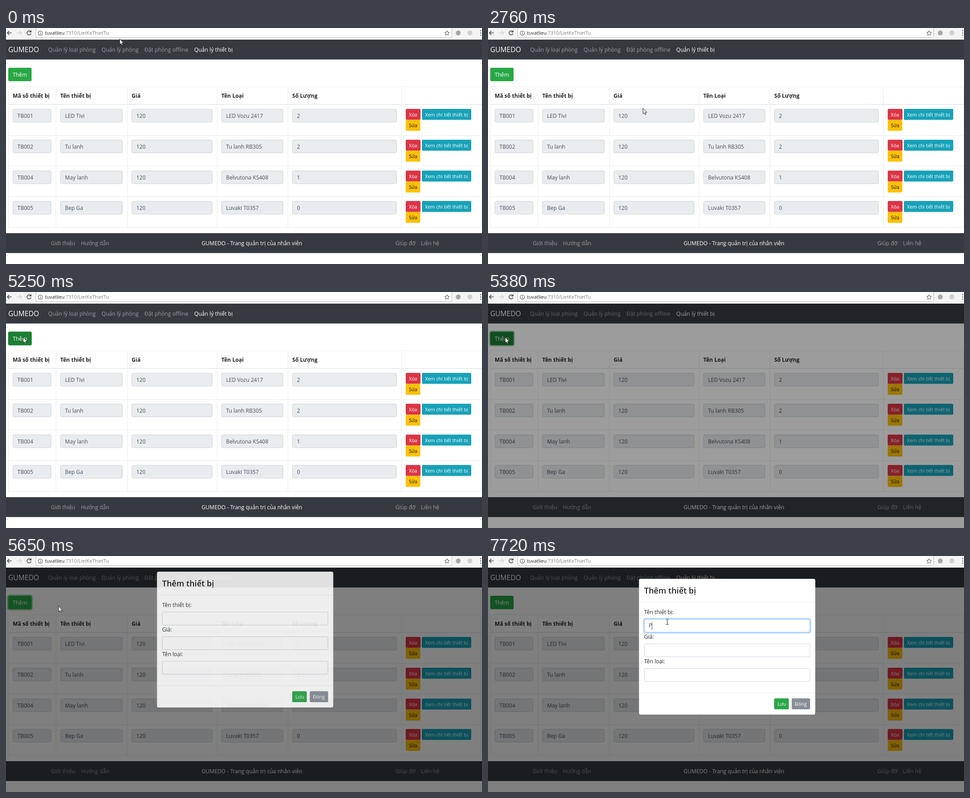
These frames come from a looping animation (1061 px wide and 528 px high, 8 s). An HTML page:

```html
<!DOCTYPE html>
<html lang="vi">
<head>
<meta charset="utf-8">
<title>Quản lý thiết bị</title>
<style>
html, body { margin: 0; width: 100%; height: 100%; overflow: hidden; background: #fff; }
svg { display: block; width: 1061px; height: 528px; }
text { font: 12.1px "Open Sans", "Noto Sans", sans-serif; white-space: pre; }
.brand { font-size: 15.5px; fill: #fff; }
.link { fill: #9a9da0; }
.on { fill: #fff; }
.head { font-weight: 700; fill: #212529; }
.val { font-size: 12px; fill: #495057; }
.small { font-size: 10.7px; }
.title { font-size: 18px; font-weight: 600; fill: #212529; }
.label { fill: #212529; }
.url { font-size: 10.7px; fill: #808080; }
.url tspan { fill: #222; }
.anim { animation: 8s step-end infinite; }
#shade { animation-name: shade; }
#add { animation-name: add; }
#ring { animation-name: ring; }
#modal { animation-name: modal; }
#focus { animation-name: focus; }
#caret { animation-name: caret; }
#typed { animation-name: typed; }
#pointer { animation-name: move; }
#arrow { animation-name: arrow; }
#beam { animation-name: beam; }

@keyframes shade {
  0% { opacity: 0; }
  67.15% { opacity: .39; }
  68.9%, 100% { opacity: .5; }
}
@keyframes add {
  0% { fill: #28a745; }
  62% { fill: #218838; }
  65.5% { fill: #1e7e34; }
  68.9%, 100% { fill: #28a745; }
}
@keyframes ring {
  0% { stroke-width: 0; }
  65.5% { stroke-width: 2px; }
  67.15% { stroke-width: 5px; }
  81.2% { stroke-width: 1px; }
  82.9%, 100% { stroke-width: 0; }
}
@keyframes modal {
  0% { opacity: 0; transform: translateY(-16px); }
  70.5% { opacity: .87; transform: translateY(-16px); }
  72.2% { opacity: 1; transform: translateY(-2px); }
  73.9%, 100% { opacity: 1; transform: none; }
}
@keyframes focus {
  0% { opacity: 0; }
  81.2% { opacity: .85; }
  82.9%, 100% { opacity: 1; }
}
@keyframes caret {
  0% { opacity: 0; transform: none; }
  81.2% { opacity: 1; transform: none; }
  86.4% { opacity: 0; transform: none; }
  93.05% { opacity: 1; transform: none; }
  96.4%, 100% { opacity: 1; transform: translateX(7px); }
}
@keyframes typed {
  0% { opacity: 0; }
  96.4%, 100% { opacity: 1; }
}
@keyframes move {
  0%, 2% { transform: translate(253px, 24px); animation-timing-function: steps(8, start); }
  15.6% { transform: translate(699px, 245px); animation-timing-function: steps(3, start); }
  20.7% { transform: translate(891px, 262px); animation-timing-function: steps(5, start); }
  29.5% { transform: translate(606px, 186px); animation-timing-function: steps(4, start); }
  36.1% { transform: translate(345px, 179px); animation-timing-function: steps(4, start); }
  43.3% { transform: translate(679px, 239px); animation-timing-function: steps(3, start); }
  48.4% { transform: translate(887px, 225px); animation-timing-function: steps(5, start); }
  57.2% { transform: translate(239px, 103px); animation-timing-function: steps(4, start); }
  63.9%, 68.9% { transform: translate(38px, 101px); animation-timing-function: steps(1, start); }
  70.5% { transform: translate(46px, 104px); animation-timing-function: steps(5, start); }
  78.8% { transform: translate(399px, 142px); animation-timing-function: steps(2, start); }
  82.2%, 100% { transform: translate(399px, 147px); }
}
@keyframes arrow {
  0% { opacity: 1; }
  77.1%, 100% { opacity: 0; }
}
@keyframes beam {
  0% { opacity: 0; }
  77.1%, 100% { opacity: 1; }
}
</style>
</head>
<body>
<svg viewBox="0 0 1061 528">
  <rect width="1061" height="528" fill="#fff"/>
  <rect y="26" width="1061" height="44.5" fill="#343a40"/>
  <rect y="459" width="1061" height="44.5" fill="#343a40"/>
  <g id="table"></g>
  <text class="brand" x="5" y="54">GUMEDO</text>
  <g id="links"></g>
  <rect id="ring" class="anim" x="5" y="89" width="52" height="30" rx="3" fill="none" stroke="#28a745" stroke-opacity=".5"/>
  <rect id="add" class="anim" x="5" y="89" width="52" height="30" rx="3"/>
  <text class="on" x="15" y="109">Thêm</text>
  <g id="actions"></g>
  <rect id="shade" class="anim" y="26" width="1061" height="502"/>

  <g id="toolbar">
    <rect width="1061" height="26" fill="#f4f4f4"/>
    <rect x="66.5" y="-3.5" width="927" height="25" rx="2" fill="#fff" stroke="#bdbdbd"/>
    <g fill="none" stroke="#4a4a4a" stroke-width="1.6">
      <path d="M12.5 11H3M7.5 6.5L3 11l4.5 4.5"/>
      <path d="M24 11h10M30 6.5l4.5 4.5-4.5 4.5" stroke="#cfcfcf"/>
      <path d="M55 8.2A4.5 4.5 0 1 0 55.7 12.2M56 5.5V9H52.3"/>
      <circle cx="76.5" cy="11.5" r="4.7" stroke-width="1.1"/>
      <path d="M76.5 10.8V14M76.5 8.6V9.8" stroke-width="1.2"/>
      <path d="M983 6l1.5 3.600 3.8.3-2.9 2.5.9 3.8-3.3-2-3.3 2 .9-3.8-2.9-2.5 3.8-.3z" stroke-width="1"/>
    </g>
    <text class="url" x="87" y="15"><tspan>tuvatlieu</tspan>:7310/LietKeThietTu</text>
    <circle cx="1008" cy="11" r="5.5" fill="#a8a8a8"/>
    <circle cx="1034" cy="11" r="5.5" fill="#d0d0d0"/>
    <path d="M1057 6h2M1057 11h2M1057 16h2" stroke="#555" stroke-width="2"/>
  </g>

  <g id="modal" class="anim">
    <rect x="336" y="50" width="394" height="306" rx="4.5" fill-opacity=".2"/>
    <rect x="336.5" y="51" width="393" height="304" rx="4" fill="#fff"/>
    <path d="M337 103.5H729M337 306.5H729" stroke="#e9ecef"/>
    <text class="title" x="348" y="84">Thêm thiết bị</text>
    <g id="form"></g>
    <g id="focus" class="anim" fill="none">
      <rect x="347" y="140" width="372" height="32" rx="4" stroke="#007bff" stroke-opacity=".25" stroke-width="3"/>
      <rect x="348.5" y="141.5" width="369" height="29" rx="3" stroke="#80bdff"/>
    </g>
    <text id="typed" class="val anim" x="358" y="160">P</text>
    <rect id="caret" class="anim" x="358" y="148" width="1" height="17" fill="#495057"/>
  </g>

  <g id="pointer" class="anim">
    <path id="arrow" class="anim" d="M.5 .5V13L3.3 10.4 5.2 14.8 7.2 14 5.4 9.7H9.3Z" fill="#fff" stroke="#111" stroke-width=".9"/>
    <path id="beam" class="anim" d="M-2.5 -5.5H-.5L.5 -5 1.5 -5.5H3.5M.5 -5V6M-2.5 6.5H-.5L.5 6 1.5 6.5H3.5" fill="none" stroke="#222"/>
  </g>
</svg>
<script>
const put = (id, parts) => { document.getElementById(id).innerHTML = parts.join(''); };
const text = (cls, x, y, s) => `<text class="${cls}" x="${x}" y="${y}">${s}</text>`;
const field = (x, y, w, fill) =>
  `<rect x="${x + .5}" y="${y + .5}" width="${w - 1}" height="29" rx="3" fill="${fill}" stroke="#ced4da"/>`;
const button = (x, y, w, color, s, ink = '#fff') =>
  `<rect x="${x}" y="${y}" width="${w}" height="24.5" rx="2.5" fill="${color}"/>` +
  `<text class="small" x="${x + 7}" y="${y + 16.5}" fill="${ink}">${s}</text>`;

const cols = [
  [5, 86, 'Mã số thiết bị'], [111, 139, 'Tên thiết bị'], [270, 180, 'Giá'],
  [470, 138, 'Tên Loại'], [628, 233, 'Số Lượng']
];
const rows = [
  ['TB001', 'LED Tivi', 120, 'LED Vozu 2417', 2],
  ['TB002', 'Tu lanh', 120, 'Tu lanh RB305', 2],
  ['TB004', 'May lanh', 120, 'Belvutona KS408', 1],
  ['TB005', 'Bep Ga', 120, 'Luvaki T0357', 0]
];
const rowY = i => Math.round(171 + i * 68.8);

const lines = [...cols.map(c => c[0]), 881, 1060].map(x => `M${x + .5} 131V447`).join('') +
  [131, 170, 171, 240, 308, 377, 446].map(y => `M5 ${y + .5}H1061`).join('');

put('table', [
  `<path d="${lines}" stroke="#e9ecef"/>`,
  ...cols.map(([x, , name]) => text('head', x + 10, 156, name)),
  ...rows.flatMap((row, i) => cols.map(([x, w], c) =>
    field(x + 10, rowY(i) + 10, w, '#e9ecef') + text('val', x + 20.5, rowY(i) + 30, row[c])))
]);

put('actions', rows.map((_, i) => {
  const y = rowY(i) + 10;
  return button(891, y, 33, '#dc3545', 'Xóa') +
    button(927, y, 110, '#17a2b8', 'Xem chi tiết thiết bị') +
    button(891, y + 24.5, 32.5, '#ffc107', 'Sửa', '#111');
}));

put('links', [
  text('link', 94, 53, 'Quản lý loại phòng'),
  text('link', 213, 53, 'Quản lý phòng'),
  text('link', 308.5, 53, 'Đặt phòng offline'),
  text('on', 419.5, 53, 'Quản lý thiết bị'),
  text('link', 100, 486, 'Giới thiệu'),
  text('link', 167, 486, 'Hướng dẫn'),
  text('on', 436, 486, 'GUMEDO - Trang quản trị của nhân viên'),
  text('link', 868, 486, 'Giúp đỡ'),
  text('link', 925, 486, 'Liên hệ')
]);

put('form', [
  ...['Tên thiết bị:', 'Giá:', 'Tên loại:'].map((s, i) =>
    text('label', 348, 130 + i * 55, s) + field(348, 141 + i * 55, 370, '#fff')),
  button(638, 318.5, 32.5, '#28a745', 'Lưu'),
  button(677, 318.5, 41, '#868e96', 'Đóng')
]);
</script>
</body>
</html>
```
